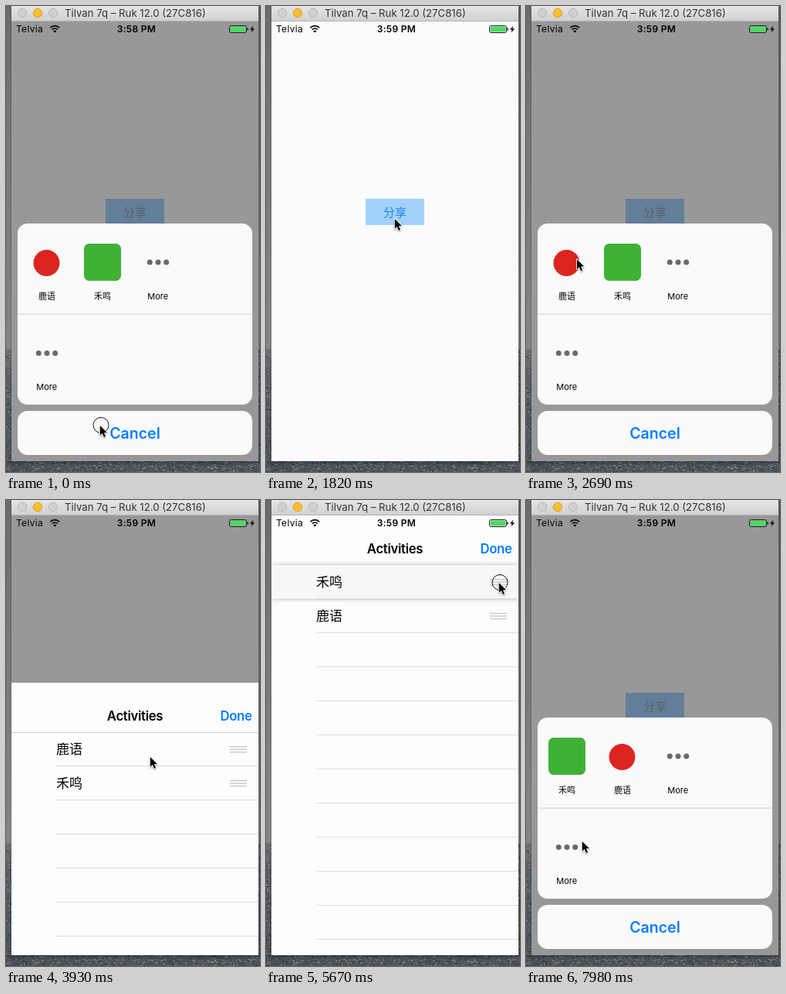
These frames come from a looping animation (329 by 602 pixels, 8 s). An HTML page with a canvas:

```html
<!DOCTYPE html>
<html lang="zh">
<head>
<meta charset="utf-8">
<title>Share sheet</title>
<style>
  html, body { margin: 0; width: 100%; height: 100%; overflow: hidden; background: #777; }
  canvas { display: block; width: 329px; height: 602px; }
</style>
</head>
<body>
<canvas id="stage"></canvas>
<script>
const W = 329, H = 602, LOOP = 8000, STEP = 58.4;
const canvas = document.getElementById('stage');
const dpr = window.devicePixelRatio || 1;
canvas.width = Math.round(W * dpr);
canvas.height = Math.round(H * dpr);
let g = canvas.getContext('2d');

const LATIN = 'Inter, "Liberation Sans", sans-serif';
const CJK = '"Noto Sans CJK SC", "Noto Sans CJK", sans-serif';
const BLUE = '#087dff';
const FIRST = '鹿语', SECOND = '禾鸣';

// ---- drawing helpers ----
function rect(x, y, w, h, fill) {
  g.fillStyle = fill;
  g.fillRect(x, y, w, h);
}
function round(x, y, w, h, r, fill) {
  g.beginPath();
  g.roundRect(x, y, w, h, r);
  g.fillStyle = fill;
  g.fill();
}
function disc(x, y, r, fill, stroke) {
  g.beginPath();
  g.arc(x, y, r, 0, 7);
  if (fill) { g.fillStyle = fill; g.fill(); }
  if (stroke) { g.strokeStyle = stroke; g.lineWidth = 1; g.stroke(); }
}
function poly(points, fill) {
  g.beginPath();
  points.forEach(([x, y]) => g.lineTo(x, y));
  g.closePath();
  g.fillStyle = fill;
  g.fill();
}
// y is the optical middle of the line
function text(str, x, y, size, o = {}) {
  const cjk = str.charCodeAt(0) > 0x2fff;
  g.font = `${o.weight || 400} ${size}px ${cjk ? CJK : LATIN}`;
  g.letterSpacing = (o.space || 0) + 'px';
  g.textAlign = o.align || 'left';
  g.fillStyle = o.color || '#000';
  g.fillText(str, x, y + size * (cjk ? 0.38 : 0.36));
  g.letterSpacing = '0px';
}

// ---- timing helpers ----
const clamp = v => Math.max(0, Math.min(1, v));
const ease = p => p * p * (3 - 2 * p);
const mix = (a, b, p) => a + (b - a) * p;

function spring(t, start, lead, rate = 0.013) {
  if (t < start) return 0;
  const n = Math.floor((t - start) / STEP + 0.1);
  const x = Math.max(0, n * STEP + lead) * rate;
  const p = 1 - (1 + x) * Math.exp(-x);
  return p > 0.9985 ? 1 : p;
}

const PATH = [
  [0, 121, 541], [650, 121, 541], [880, 137, 492], [1400, 166, 274],
  [2050, 166, 274], [2560, 72, 320], [2610, 72, 320], [2750, 61, 330],
  [3300, 61, 330], [3530, 186, 331], [4000, 186, 331], [4520, 255, 146],
  [4580, 255, 146], [4730, 284, 136], [4850, 301, 151], [5290, 301, 151],
  [5600, 301, 106], [5780, 301, 106], [6050, 297, 64], [6500, 297, 64],
  [7200, 131, 460], [7760, 131, 460], [7975, 72, 440], [LOOP, 72, 440]
];
function pointer(t) {
  const i = PATH.findIndex(k => k[0] > t);
  const a = PATH[i - 1], b = PATH[i];
  const p = ease((t - a[0]) / (b[0] - a[0]));
  return [mix(a[1], b[1], p), mix(a[2], b[2], p)];
}

// ---- desktop ----
function makeDesktop() {
  const c = document.createElement('canvas');
  c.width = canvas.width;
  c.height = canvas.height;
  const screen = g;
  g = c.getContext('2d');
  g.scale(dpr, dpr);
  let seed = 11;
  const rnd = () => (seed = seed * 16807 % 2147483647) / 2147483647;
  const sky = g.createLinearGradient(0, 0, 0, 450);
  sky.addColorStop(0, '#6b6b6c');
  sky.addColorStop(0.4, '#777');
  sky.addColorStop(1, '#858585');
  rect(0, 0, W, H, sky);
  const sea = g.createLinearGradient(0, 440, 0, H);
  sea.addColorStop(0, '#747678');
  sea.addColorStop(0.2, '#5a5e62');
  sea.addColorStop(1, '#4b5359');
  rect(0, 443, W, H - 443, sea);
  const tones = ['#353c42', '#40474c', '#565d62', '#6b7175', '#83888b'];
  const speck = (x, y) => rect(x, y, 1 + rnd() * 2.5, 1, tones[Math.floor(rnd() * 5)]);
  for (let i = 0; i < 170; i++) speck(Math.floor(rnd() * 7), 445 + Math.floor(rnd() * 157));
  for (let i = 0; i < 800; i++) speck(Math.floor(rnd() * W), 588 + Math.floor(rnd() * 14));
  for (let i = 0; i < 60; i++) speck(327, 445 + Math.floor(rnd() * 157));
  const shade = g.createLinearGradient(0, 588, 0, 594);
  shade.addColorStop(0, 'rgba(0,0,0,.3)');
  shade.addColorStop(1, 'rgba(0,0,0,0)');
  rect(0, 588, W, 6, shade);
  rect(6, 0, 1, 588, 'rgba(0,0,0,.18)');
  rect(327, 0, 2, 588, 'rgba(0,0,0,.2)');
  g = screen;
  return c;
}

function titleBar() {
  const bar = g.createLinearGradient(0, 0, 0, 20);
  bar.addColorStop(0, '#e6e6e6');
  bar.addColorStop(1, '#d0d0d0');
  rect(7, 0, 320, 20, bar);
  rect(7, 19, 320, 1, '#b3b3b3');
  disc(21, 9, 5.7, '#d1d0d1', '#b9b8b9');
  disc(41, 9, 5.7, '#fdbe2f', '#dfa12b');
  disc(61, 9, 5.7, '#d1d0d1', '#b9b8b9');
  text('Tilvan 7q – Ruk 12.0 (27C816)', 76, 9.5, 13.2, { color: '#333' });
}

function statusBar(clock) {
  text('Telvia', 13, 30, 12, { space: 0.3 });
  g.lineWidth = 1.7;
  g.strokeStyle = '#000';
  for (const r of [5, 8.3]) {
    g.beginPath();
    g.arc(63.3, 34, r, -Math.PI * 0.75, -Math.PI * 0.25);
    g.stroke();
  }
  g.beginPath();
  g.moveTo(63.3, 34.6);
  g.arc(63.3, 34.6, 3, -Math.PI * 0.75, -Math.PI * 0.25);
  g.fillStyle = '#000';
  g.fill();
  text(clock, 169, 30, 12, { weight: 600, align: 'center', space: 0.3 });
  g.beginPath();
  g.roundRect(289.5, 25.5, 22, 9, 2);
  g.lineWidth = 1;
  g.strokeStyle = '#222';
  g.stroke();
  round(290.5, 26.5, 20, 7, 1, '#4cd964');
  round(312.3, 28.3, 1.5, 3.5, 0.7, '#222');
  poly([[320.3, 25.5], [316, 30.6], [318.6, 30.6], [317.6, 34.6], [322, 29.2], [319.3, 29.2]], '#000');
}

// ---- screens ----
function home(dim) {
  rect(7, 20, 320, 568, '#fdfdfd');
  rect(129, 249, 76, 34, '#a5d2ff');
  const fade = clamp(dim * 1.5);
  const tint = `rgb(${mix(20, 154, fade)},${mix(133, 159, fade)},${mix(255, 165, fade)})`;
  text('分享', 167, 266, 15, { align: 'center', color: tint });
  if (dim > 0) rect(7, 20, 320, 568, `rgba(0,0,0,${0.4 * dim})`);
}

function dots(x, y) {
  for (const d of [-10.7, 0, 10.7]) disc(x + d, y, 3.5, '#69696d');
}

function sheet(shown, swapped) {
  if (shown <= 0) return;
  g.save();
  g.translate(0, Math.round(307 * (1 - shown)));
  round(15, 281, 304, 234, 13, '#fafafa');
  rect(15, 397.5, 304, 1, '#d4d4d6');
  const label = (s, x, y) => text(s, x, y, 11, { align: 'center' });
  const red = swapped ? 125 : 53;
  const green = 178 - red;
  disc(red - 0.5, 332, 17, '#dc2420');
  round(green - 24, 307, 48, 48, 6.5, '#3eb135');
  label(FIRST, red, 375);
  label(SECOND, green, 375);
  dots(197, 331);
  label('More', 196.7, 375);
  dots(53, 448.5);
  label('More', 52.7, 492.5);
  round(15, 523, 304, 57, 13, '#fafafa');
  text('Cancel', 167, 551.5, 19.5, { weight: 600, align: 'center', color: BLUE });
  g.restore();
}

function row(label, y, lifted) {
  if (lifted) {
    g.save();
    g.shadowColor = 'rgba(0,0,0,.3)';
    g.shadowBlur = 5 * dpr;
    rect(7, y, 320, 43.5, 'rgba(253,253,253,.92)');
    g.restore();
  }
  text(label, 65, y + 22, 17);
  for (const d of [18, 21.5, 25]) rect(290, y + d, 22, 1.3, '#c5c5c9');
}

function activities(t, shown) {
  if (shown <= 0) return;
  const lift = t >= 5320 && t < 6130;
  let a = 0, b = 44;
  if (t >= 5320) {
    b = Math.max(0, 44 + pointer(Math.min(t, 5700))[1] - 151);
    a = 44 * ease(clamp((t - 5430) / 250));
  }
  if (t > 5780) b = 0;
  g.save();
  g.translate(0, Math.round(20 + 568 * (1 - shown)));
  rect(7, 0, 320, 568, '#fdfdfd');
  rect(7, 64, 320, 1, '#d0d0d2');
  text('Activities', 167, 42.5, 16.7, { weight: 600, align: 'center', space: -0.3 });
  text('Done', 318.5, 42.5, 16.7, { weight: 600, align: 'right', color: BLUE, space: -0.3 });
  for (let y = 107; y < 568; y += 44) rect(65, y, 262, 1, '#dedee0');
  row(FIRST, 64 + a);
  row(SECOND, 64 + b, lift);
  g.restore();
}

function arrow(x, y) {
  const shape = [[0, 0], [0, 14.5], [3.3, 11.4], [5.8, 17], [8.2, 15.9], [5.8, 10.5], [10.3, 10.2]];
  g.save();
  g.translate(x + 0.8, y + 1);
  g.scale(0.88, 0.88);
  g.shadowColor = 'rgba(0,0,0,.3)';
  g.shadowBlur = 2 * dpr;
  g.shadowOffsetY = dpr;
  g.lineJoin = 'round';
  g.lineWidth = 2;
  g.strokeStyle = '#fff';
  poly(shape, '#000');
  g.stroke();
  g.shadowColor = 'transparent';
  poly(shape, '#000');
  g.restore();
}

const desktop = makeDesktop();

function draw(t) {
  g.setTransform(1, 0, 0, 1, 0, 0);
  g.drawImage(desktop, 0, 0);
  g.setTransform(dpr, 0, 0, dpr, 0, 0);
  titleBar();

  const closing = t >= 460 ? 1 : spring(t, 290, 45, 0.022);
  const sheetIn = t < 1820 ? 1 - closing : spring(t, 1820, 15);
  const listIn = t < 6420 ? spring(t, 3760, -14) : 1 - spring(t, 6420, 52.5);

  g.save();
  g.beginPath();
  g.rect(7, 20, 320, 568);
  g.clip();
  home(sheetIn);
  sheet(sheetIn, t >= 5500);
  activities(t, listIn);
  statusBar(t < 460 ? '3:58 PM' : '3:59 PM');
  g.restore();

  const [x, y] = pointer(t);
  if (t < 50 || (t >= 5090 && t < 5760)) disc(x + 2, y + 0.5, 10, null, '#111');
  arrow(x, y);
}

const begin = performance.now();
function loop() {
  draw((performance.now() - begin) % LOOP);
  requestAnimationFrame(loop);
}
loop();
</script>
</body>
</html>
```
